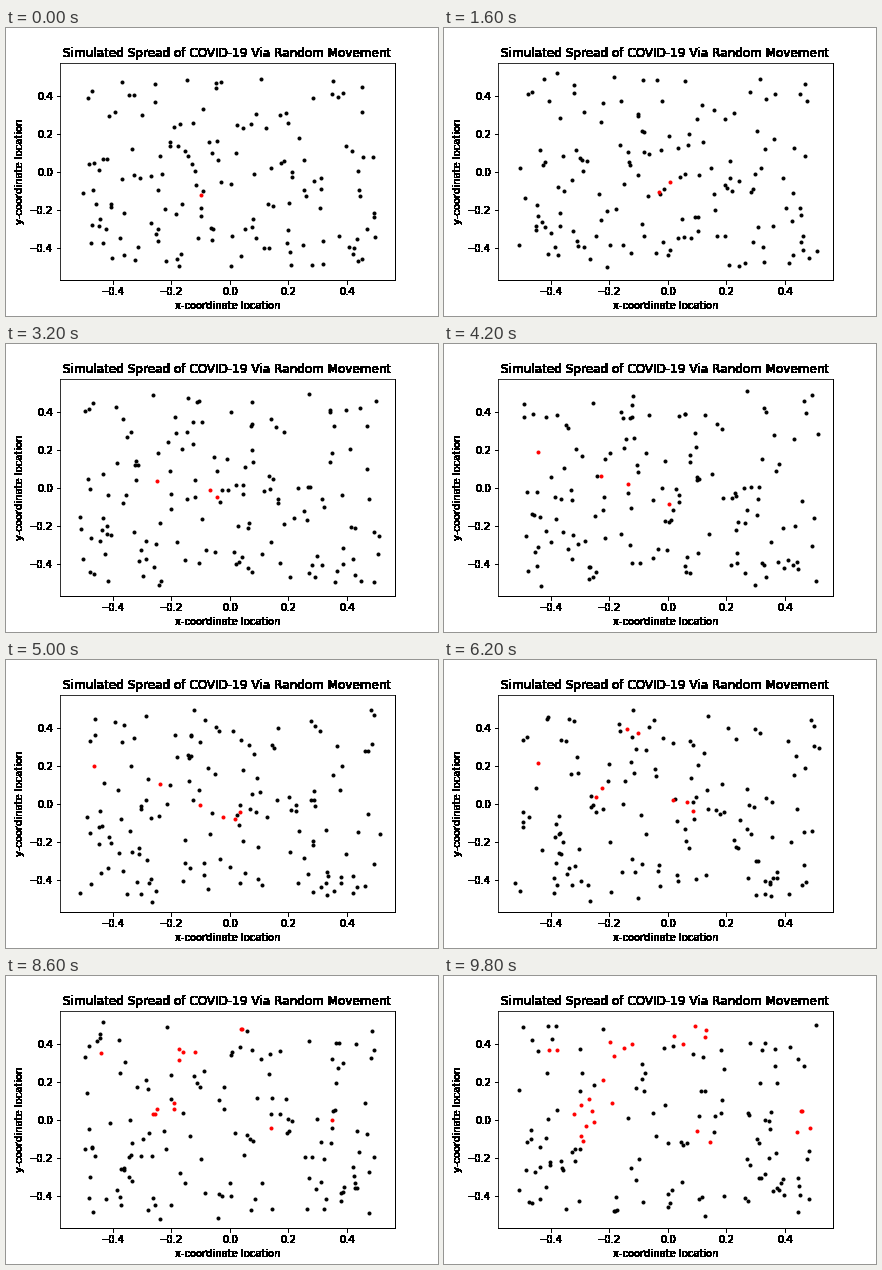
Animation, 432 px wide and 288 px high, one loop 10000 ms. Source, as a matplotlib script:

```python
import numpy as np
import matplotlib.pyplot as plt
from matplotlib.animation import FuncAnimation

FRAMES = 50
INTERVAL = 200
DOTS = 150
STEP = 0.03
rng = np.random.default_rng(7)

# The first carriers drift across the square, from one point to another.
DRIFTS = np.array([
    [(-.10, -.12), (.10, -.06)],
    [(-.09, -.10), (-.32, .03)],
    [(-.23, -.01), (-.27, .11)],
    [(-.27, -.02), (-.38, .37)],
    [(.13, -.17), (-.19, .09)],
    [(-.50, -.11), (.46, .05)],
    [(-.30, .30), (.02, .44)],
])


def walk(start):
    """Random walk that turns back once it leaves the unit square."""
    track = [start]
    for _ in range(FRAMES - 1):
        pos = track[-1]
        step = rng.uniform(-STEP, STEP, pos.shape)
        step = np.where(abs(pos) > 0.5, -np.sign(pos) * abs(step), step)
        track.append(pos + step)
    return np.array(track)


def drift(start, end):
    """Random walk bent so that it finishes at the given end."""
    track = walk(start)
    bend = np.linspace(0, 1, FRAMES)[:, None, None]
    return track + bend * (end - track[-1])


def spread(dots, cases):
    """Frame in which each dot turns red: the closest dot catches it next."""
    onset = np.full(DOTS, FRAMES)
    for n in range(1, cases[-1] + 1):
        t = int(np.ceil(np.interp(n, cases, (0, 8, 16, 25, 36, 43, 49))))
        if n <= len(DRIFTS):
            onset[n - 1] = t
            continue
        sick = onset < FRAMES
        gap = dots[t, :, None] - dots[t, sick]
        reach = np.hypot(gap[..., 0], gap[..., 1]).min(axis=1)
        onset[np.where(sick, np.inf, reach).argmin()] = t
    return onset


first = drift(DRIFTS[:, 0], DRIFTS[:, 1])
others = walk(rng.uniform(-0.5, 0.5, (DOTS - len(DRIFTS), 2)))
dots = np.concatenate([first, others], axis=1)
onset = spread(dots, (1, 2, 3, 6, 11, 14, 27))


def harden(img, dpi):
    """Make every touched pixel fully opaque."""
    img[..., :3] = 0
    img[..., 3] = img[..., 3] > 0
    return img, 0, 0


plt.rcParams["font.family"] = "DejaVu Sans"
fig, ax = plt.subplots(figsize=(6, 4), dpi=72, facecolor="white")
fig.subplots_adjust(left=0.125, right=0.9, bottom=0.125, top=0.88)

ticks = np.arange(-2, 3) / 5
ax.set(xlim=(-0.58, 0.5635), ylim=(-0.568, 0.576), xticks=ticks, yticks=ticks,
       xlabel="x-coordinate location", ylabel="y-coordinate location",
       title="Simulated Spread of COVID-19 Via Random Movement")

hard = [ax.title, ax.spines["bottom"], ax.spines["right"]]
for axis in (ax.xaxis, ax.yaxis):
    hard += [axis.label, *axis.get_ticklabels(), *axis.get_ticklines()]
for artist in hard:
    artist.set_agg_filter(harden)

black, = ax.plot([], [], "k.")
red, = ax.plot([], [], "r.")


def update(i):
    sick = onset <= i
    black.set_data(*dots[i, ~sick].T)
    red.set_data(*dots[i, sick].T)
    return black, red


anim = FuncAnimation(fig, update, frames=FRAMES, interval=INTERVAL,
                     init_func=lambda: update(0), repeat=True, repeat_delay=0)
plt.show()
```
